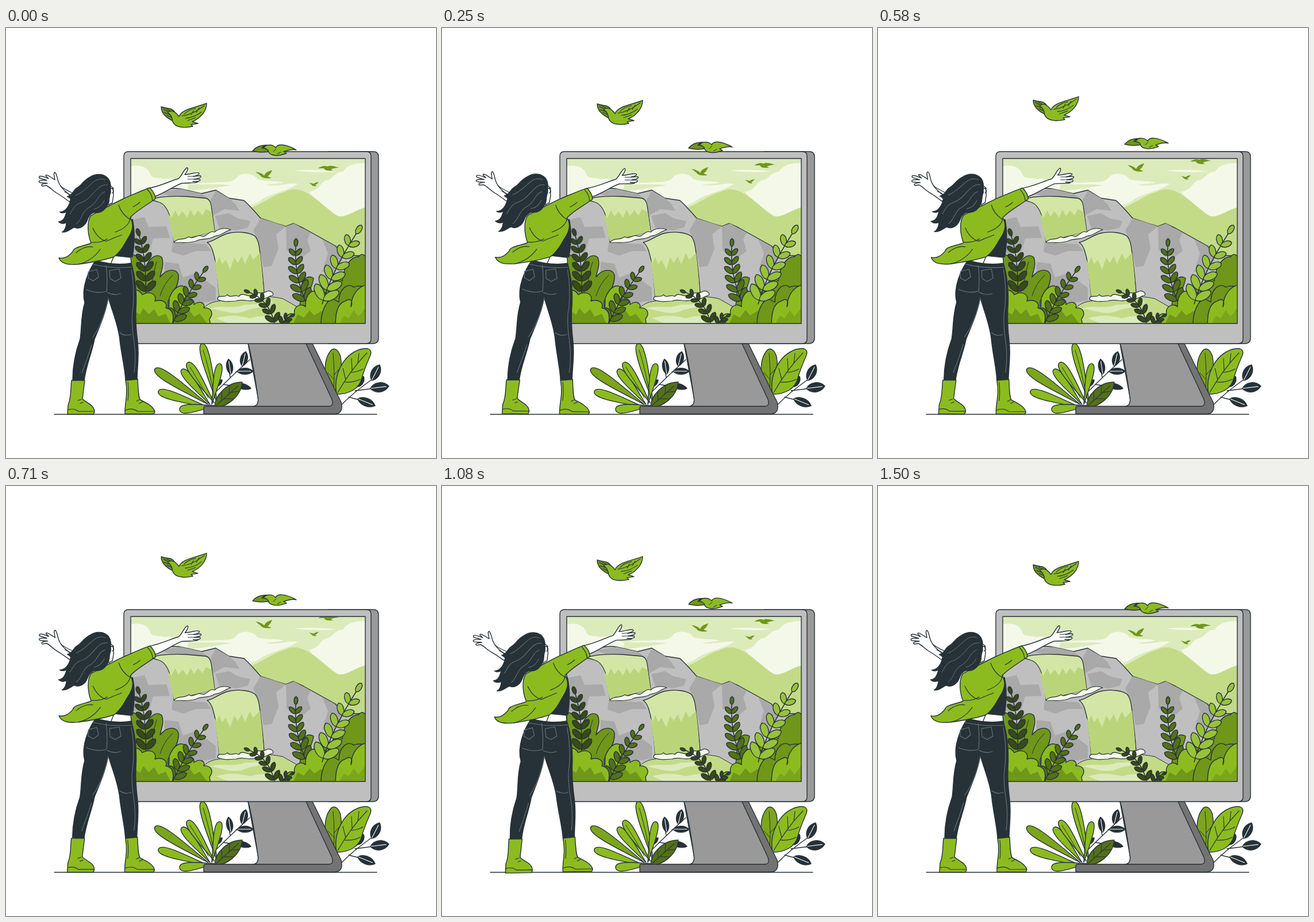
An HTML page with a canvas that plays this animation: 748x748 px, repeating every 1.54 s.

```html
<!DOCTYPE html>
<html lang="en">
<head>
<meta charset="utf-8">
<title>Waterfall view</title>
<style>
html, body { margin: 0; width: 100%; height: 100%; overflow: hidden; background: #fff; }
canvas { display: block; width: 748px; height: 748px; }
</style>
</head>
<body>
<canvas id="stage"></canvas>
<script>
const SIZE = 748, LOOP = 1540, CYCLE = 36, FPS = 24;
const INK = '#263238', GREEN = '#8cbb20', MID = '#70961a', DEEP = '#54701a', DARK = '#38491a';
const SKY = '#dcebbc', CLOUD = '#f4f8e9', HILL = '#c3db87', FALL = '#bad579';
const ROCK = '#bfbfbf', SHADE = '#a9a9a9', SEAM = '#69757a';

const canvas = document.getElementById('stage');
const ctx = canvas.getContext('2d');
const dpr = window.devicePixelRatio || 1;
canvas.width = canvas.height = SIZE * dpr;

// filled and outlined shape, flat shape, open line
function shape(d, fill, stroke = INK, width = 1.4) {
  const path = new Path2D(d);
  if (fill) { ctx.fillStyle = fill; ctx.fill(path); }
  if (stroke) { ctx.strokeStyle = stroke; ctx.lineWidth = width; ctx.stroke(path); }
}
const flat = (d, fill) => shape(d, fill, null);
const line = (d, color = INK, width = 1.4) => shape(d, null, color, width);

// leaf from base b to tip t; profiles place the widest part
const PROFILE = { blade: [.4, 1, .3], point: [.2, .7, .8], oval: [.15, .85, .85] };
function leaf(bx, by, tx, ty, w, fill, profile = 'blade', vein = null) {
  const dx = tx - bx, dy = ty - by, len = Math.hypot(dx, dy);
  const nx = -dy / len * w, ny = dx / len * w;
  const at = (u, s) => `${bx + dx * u + nx * s} ${by + dy * u + ny * s}`;
  const [a, b, k] = PROFILE[profile];
  shape(`M${bx} ${by} C${at(a, k)} ${at(b, 1)} ${tx} ${ty} C${at(b, -1)} ${at(a, -k)} ${bx} ${by}Z`, fill);
  if (vein) line(`M${at(.05, 0)} L${at(.85, 0)}`, vein, 1.1);
}

// curved stem with pairs of leaves that get smaller toward the top
function sprig(x0, y0, cx, cy, x1, y1, pairs, len, w, fill) {
  line(`M${x0} ${y0} Q${cx} ${cy} ${x1} ${y1}`, INK, 1.5);
  for (let i = 0; i <= pairs; i++) {
    const u = .06 + .94 * i / pairs, v = 1 - u;
    const x = v * v * x0 + 2 * u * v * cx + u * u * x1;
    const y = v * v * y0 + 2 * u * v * cy + u * u * y1;
    const a = Math.atan2(v * (cy - y0) + u * (y1 - cy), v * (cx - x0) + u * (x1 - cx));
    const size = len * (1 - .45 * u), wide = w * (1 - .4 * u);
    for (const turn of i === pairs ? [0] : [-.75, .75])
      leaf(x, y, x + size * Math.cos(a + turn), y + size * Math.sin(a + turn), wide, fill, 'oval');
  }
}

function floorPlants() {
  line('M366 632 Q392 606 424 577 M390 607 L386 588 M400 598 L424 597 M378 620 L416 626');
  leaf(411, 588, 417, 563, 9, INK, 'point', '#fff');
  leaf(391, 602, 387, 576, 8, INK, 'point', '#fff');
  leaf(402, 597, 430, 597, 8, INK, 'point', '#fff');
  leaf(398, 620, 426, 627, 7, INK, 'point');
  leaf(364, 624, 376, 612, 5, INK, 'point');
  leaf(352, 655, 259, 593, 15, '#7ca51d');
  leaf(368, 655, 341, 549, 14, GREEN);
  leaf(355, 655, 306, 594, 13, GREEN);
  leaf(362, 652, 316, 582, 14, GREEN);
  leaf(358, 655, 372, 584, 12, GREEN);
  leaf(352, 660, 265, 632, 14, GREEN);
  leaf(364, 657, 302, 664, 14, GREEN);
  line('M362 640 Q354 595 343 560 M352 644 Q338 618 320 590', INK, 1);
  leaf(363, 659, 411, 616, 18, DEEP, 'point', INK);
  line('M376 648 L375 633 M388 637 L389 622 M379 645 L395 645 M391 634 L405 632', INK, 1);

  line('M582 657 Q604 634 640 609 M607 631 L655 625 M596 642 L630 651');
  leaf(636, 613, 650, 586, 11, INK, 'point', '#fff');
  leaf(634, 627, 666, 623, 12, INK, 'point', '#fff');
  leaf(612, 645, 642, 657, 10, INK, 'point', '#fff');
  leaf(612, 624, 622, 606, 7, INK, 'point');
  shape('M571 637 C552 616 550 578 566 560 C572 555 579 561 582 572 C586 596 580 620 571 637Z', '#7ca51d');
  line('M570 632 Q572 598 569 566 M571 612 L560 600 M571 603 L581 592', INK, 1);
  shape('M575 637 C569 606 585 569 616 559 C630 555 637 559 634 569 C628 583 623 594 619 609 C615 627 598 637 575 637Z', GREEN);
  line('M577 634 Q600 594 628 565 M591 612 L586 592 M602 596 L601 575 M612 583 L614 566 M589 616 Q605 617 616 611 M601 599 Q613 598 621 593', INK, 1.1);
}

function monitor() {
  shape('M347 658 H430 Q441 657 438 641 L421 549 H533 L583 651 Q588 671 571 671.5 H344 V661 Q344 658 347 658Z', '#737373');
  shape('M420 545 H520 L567 646 Q571 658 561 658 H430 Q441 657 438 641 C433 608 429 574 420 545Z', '#999');
  shape('M560 215 H639 Q648 215 648 224 V539 Q648 549 638 549 H560Z', '#999');
  shape('M213 215 H627 Q635 215 635 223 V541 Q635 549 627 549 H213 Q205 549 205 541 V223 Q205 215 213 215Z', ROCK);
}

function landscape() {
  flat('M217 227 H625 V514 H217Z', SKY);
  flat('M217 241 C232 236 247 242 251 254 C254 264 266 259 276 263 C290 259 300 268 317 272 C335 268 354 270 371 268 C386 268 397 268 403 258 C413 250 432 253 437 263 C452 268 470 265 482 269 C472 272 462 271 452 273 C470 277 495 268 508 271 C490 284 457 288 440 302 L400 320 H217Z', CLOUD);
  flat('M318 271 C345 274 371 270 392 274 C362 277 340 283 315 283Z', SKY);
  flat('M500 248 Q532 245 574 249 Q540 253 500 248Z', CLOUD);
  flat('M625 235 C607 234 592 239 586 250 C571 250 569 264 557 265 C545 269 548 281 527 285 L570 340 H625Z', CLOUD);
  flat('M418 316 C446 307 462 291 485 285 C495 280 503 279 514 283 C536 290 555 313 577 327 C591 331 608 316 625 312 V410 H420Z', HILL);

  shape('M210 318 C231 306 247 291 266 285 C280 279 293 278 304 280 L340 288 L365 282 L388 296 L414 300 Q426 311 443 331 L470 340 L487 345 L500 340 L517 348 L546 364 L573 379 Q582 391 596 396 L630 396 V520 H210Z', ROCK);
  flat('M266 286 L304 280 L340 288 L353 298 L310 294 L285 292Z', SHADE);
  flat('M365 283 L388 296 L399 306 L406 318 L380 315 L360 326 L356 299Z', SHADE);
  flat('M364 327 L388 322 L403 331 L425 336 L421 347 L402 352 L371 348Z', SHADE);
  flat('M443 331 L487 345 L470 359 L474 384 L462 414 L448 416 L440 376 L430 352Z', SHADE);
  flat('M487 345 L501 340 L530 356 L524 368 L530 388 L514 400 L500 386 L488 388Z', SHADE);
  flat('M550 367 L572 380 L590 395 L571 425 L550 424 L560 392Z', SHADE);
  flat('M218 334 L241 329 L248 346 L279 345 L285 365 L256 366 L249 391 L218 392Z', SHADE);
  flat('M290 373 L348 376 L357 388 L330 388 L308 396 L288 389Z M276 407 L300 410 L308 434 L330 426 L365 452 L365 474 L328 480 L275 440Z', SHADE);

  // upper fall
  shape('M250 299 C266 293 290 292 313 293 L347 296 Q355 297 357 309 L363 353 L292 372 C290 346 286 309 266 303 Q258 300 250 299Z', '#d3e6a6', INK, 1.3);
  flat('M281 322 L288 330 L294 317 L300 328 L307 319 L315 330 L321 316 L327 327 L334 317 L342 326 L348 315 L358 320 L363 354 L292 371Z', FALL);
  // lower fall
  shape('M350 373 C362 371 371 361 387 357 C406 353 425 356 433 362 C440 369 441 384 443 400 C446 425 448 445 449 462 L371 472 C369 440 366 410 361 393 C359 384 356 377 350 373Z', '#d3e6a6', INK, 1.3);
  flat('M362 402 L366 410 L371 398 L376 411 L382 403 L390 420 L397 399 L403 409 L410 397 L416 411 L424 392 L430 403 L442 391 C445 415 447 440 448 462 L371 471 C369 447 366 423 362 402Z', FALL);
  shape('M292 373 C299 364 309 370 318 363 C326 369 332 358 340 362 C350 365 352 351 363 355 C371 347 384 348 391 351 C379 354 377 361 363 362 C352 370 339 365 330 371 C316 375 306 373 292 373Z', CLOUD, INK, 1.1);

  // pool
  shape('M330 515 C334 495 345 478 370 475 C410 469 450 463 482 471 L515 490 V520 H330Z', HILL, INK, 1);
  flat('M354 488 C379 481 393 490 416 481 C432 482 445 478 466 476 C447 488 429 486 414 493 C395 501 372 489 354 488Z M366 505 Q393 496 424 505 Q450 497 477 505 L455 513 H385Z', SKY);
  shape('M368 472 C368 462 380 471 385 464 C392 471 397 462 405 467 C411 458 420 469 429 465 C435 456 444 465 454 458 C460 456 467 461 464 465 C454 467 449 475 434 473 C424 478 412 470 400 475 C389 476 376 477 368 472Z', CLOUD, INK, 1.2);

  // left thicket
  shape('M212 520 V396 C225 389 234 402 240 423 C248 399 262 391 271 399 C276 413 269 424 268 433 C281 417 297 419 300 430 C301 450 289 462 282 475 V520Z', MID);
  line('M262 407 Q254 432 253 456 M290 430 Q274 445 268 466', INK, 1);
  sprig(243, 465, 245, 405, 232, 362, 6, 25, 8, DARK);
  shape('M282 520 L284 470 C292 448 309 442 313 456 C317 463 312 468 309 474 C321 466 328 474 327 481 C338 473 347 479 344 487 C357 486 362 496 354 506 L356 520Z', GREEN);
  flat('M283 486 L294 494 L302 486 L310 497 L319 491 L327 502 L337 497 L350 514 H283Z', MID);
  sprig(290, 514, 310, 470, 343, 425, 6, 24, 8, DEEP);
  shape('M212 520 V462 C226 451 233 457 237 464 C250 456 263 463 259 475 C272 471 282 478 278 487 C290 489 294 500 288 520Z', GREEN);
  flat('M222 514 L225 493 L233 499 L239 487 L248 498 L258 489 L265 502 L278 497 L286 514Z', MID);

  // right thicket
  shape('M558 520 L564 466 C566 434 575 430 585 440 C588 411 602 397 613 398 C622 387 628 400 630 410 V520Z', MID);
  shape('M507 520 L513 465 C511 441 522 428 535 435 C533 451 525 457 529 466 C541 448 557 444 561 458 L565 520Z', MID);
  sprig(523, 480, 501, 430, 504, 380, 6, 25, 8, DEEP);
  shape('M487 520 C482 505 490 494 502 498 C499 484 514 477 521 485 C520 463 534 450 543 463 C552 453 562 462 559 478 L572 520Z', GREEN);
  flat('M500 514 L507 498 L518 504 L528 491 L536 500 L549 492 L566 514Z', MID);
  shape('M548 520 C547 490 559 471 570 472 L579 477 C579 453 595 442 605 451 C613 446 622 452 630 447 V520Z', MID);
  sprig(550, 480, 566, 425, 609, 358, 6, 32, 11, '#98c23a');
  shape('M573 520 C573 500 575 479 590 475 C602 467 603 478 600 485 C601 463 613 449 630 446 V520Z', GREEN);
  flat('M580 514 L588 500 L596 505 L605 491 L613 502 L625 487 V514Z', '#7ca51d');

  sprig(468, 516, 458, 473, 424, 460, 5, 19, 6, DARK);
  sprig(480, 516, 484, 506, 494, 502, 2, 15, 5, DARK);
}

function screenBirds() {
  flat('M434 250 C440 251 446 253 449 257 C452 250 458 249 463 247 C461 253 458 256 455 258 L462 261 C455 262 446 262 443 257Z', MID);
  flat('M543 244 C549 240 555 239 559 241 C565 238 572 241 580 243 C571 243 568 245 565 246 L569 248 C560 249 555 248 553 244Z', MID);
  flat('M527 269 L535 271 Q539 268 544 268 Q541 272 538 273 L540 275 Q534 276 531 272Z', MID);
}

function frontBirds() {
  shape('M270 137 C280 141 289 138 293 146 L301 155 L291 162 C280 157 270 149 270 137Z', MID);
  line('M274 141 L284 147 M275 147 L287 151 M280 152 L289 156 M279 141 L285 144', INK, 1.1);
  shape('M282 146 C288 142 295 146 301 154 C306 141 328 139 349 131 C349 145 338 157 324 163 L334 166 L322 168 L325 171 C311 174 295 174 290 163 C289 156 287 150 282 148Z', GREEN);
  line('M306 153 Q324 151 345 135 M310 150 Q317 142 330 140 M312 157 Q327 156 340 146 M316 161 L330 156 M322 151 L326 144 M331 147 L336 139', INK, 1.1);

  shape('M429 214 C436 205 445 203 457 204 L462 214 C449 217 440 217 429 214Z', MID);
  shape('M445 209 C450 203 463 201 469 208 C472 202 483 200 505 212 C495 210 491 213 483 215 L488 218 L478 221 C468 223 457 221 456 213 C453 209 449 209 445 209Z', GREEN);
  flat('M446 206 L450 204 L452 206 L448 209Z', INK);
  line('M470 210 L465 215 M478 216 L472 219', INK, 1);
}

function woman() {
  // far arm and face
  shape('M110 302 C102 296 95 291 88 287 C81 283 77 277 70 274 L63 275 C60 273 62 271 72 270 L59 269 C55 267 57 264 71 265 L58 261 C56 257 60 256 74 262 L69 257 C69 254 73 256 85 264 C84 258 82 252 85 251 C88 252 89 261 91 267 C95 278 106 289 120 294Z', '#fff');
  shape('M180 273 L186 278 L187 291 L185 304 L179 307 L180 320 H160 V290Z', '#fff');
  line('M179 279 H187 M185 279 Q189 285 185 287', INK, 1.6);

  // top, waist, jeans
  shape('M188 396 L217 399 L218 411 H182Z', '#fff');
  shape('M207 338 L220 333 C224 351 224 374 220 398 L192 396Z', INK);
  shape('M156 404 C177 411 201 412 218 409 C224 430 228 460 226 490 C225 511 227 530 229 546 C232 571 228 591 228 614 L208 613 C207 592 201 570 198 543 C196 519 185 494 178 469 C174 494 164 517 154 541 C150 564 139 587 136 614 L116 612 C116 588 121 563 129 541 C132 521 130 501 137 478 C130 452 144 421 156 404Z', INK);
  line('M151 411 Q184 419 219 416 M143 424 L158 420 L161 433 L152 440 L143 435Z M180 422 L197 419 L200 435 L190 441 L181 436Z M174 413 Q177 434 175 458 Q158 463 140 455 M176 460 Q188 466 199 462 M218 420 Q224 452 221 486 Q217 506 222 540 Q227 570 223 599 M178 470 Q170 511 151 538 M198 530 Q207 537 218 533 M149 551 Q141 577 132 600', SEAM, 1.1);

  // boots
  shape('M114 613 H137 L133 645 C140 653 154 655 154 668 L152 672 H107 L108 656 C114 642 112 629 114 613Z', GREEN);
  shape('M208 613 L229 611 C230 627 230 644 234 647 C244 652 257 658 259 668 L257 671.5 H207 C206 652 213 639 208 613Z', GREEN);
  line('M108 664 Q119 661 126 667 H153 M131 646 L125 648 M134 651 L129 653 M207 665 Q220 660 229 667 H258 M233 646 L227 649 M238 650 L232 653 M212 616 Q214 635 212 648', INK, 1.1);

  // near arm
  shape('M247 279 C270 275 288 265 300 262 C307 256 309 246 315 243 C318 244 315 250 311 255 C320 255 328 251 335 252 C338 254 334 256 326 258 L338 257 C341 259 338 261 327 263 L337 263 C340 266 334 268 325 267 L333 268 C332 270 314 269 306 270 C292 275 278 286 257 294Z', '#fff');
  line('M316 258 L327 258 M316 263 L328 263', INK, 1);

  // jacket
  shape('M148 326 C165 317 185 306 204 297 C221 290 235 283 250 278 C254 281 260 290 260 297 C244 309 226 318 216 330 C224 343 219 356 212 366 C205 378 199 390 188 398 C167 405 140 409 125 411 C111 412 97 412 92 400 C103 402 110 396 116 389 C118 380 138 379 148 374 C142 359 140 337 148 326Z', GREEN);
  line('M196 308 Q201 324 216 333 M246 281 Q254 289 255 300 M151 348 Q159 366 174 371 Q188 365 201 360 M149 373 Q165 374 176 367 M216 332 Q213 347 190 355 M122 391 Q137 378 151 381 M126 411 Q150 405 164 385 M221 311 Q228 308 233 303', INK, 1.2);

  // hair
  shape('M182 272 C180 254 160 250 146 259 C134 265 131 274 123 278 C116 282 117 290 106 293 C110 296 114 296 111 303 C108 312 102 320 93 320 C97 323 101 322 105 320 C102 331 99 336 91 337 C95 341 100 341 105 339 C104 348 101 353 97 355 C106 357 113 349 119 347 C126 351 137 346 141 336 C144 328 147 323 154 321 C163 323 171 318 175 311 C182 304 178 295 182 287Z', INK, INK, 1);
  line('M173 264 C152 256 145 282 121 291 M176 273 C158 270 151 297 130 304 C119 307 115 318 111 324 M172 285 C159 289 160 305 143 313 C132 320 132 334 122 341 M171 300 Q165 313 153 315', SEAM, 1);
  line('M118 288 Q100 280 95 275 M114 296 Q110 288 102 285', INK, 1.1);
}

// sway: 0 to 1 at a quarter, -1 at three quarters, back to 0
const sway = u => u < .25 ? 4 * u : u < .75 ? 2 - 4 * u : 4 * u - 4;
const lift = u => -15 * (1 - Math.abs(1 - 2 * u));

function moved(dy, draw) {
  ctx.save();
  ctx.translate(0, dy);
  draw();
  ctx.restore();
}

function render(u) {
  ctx.setTransform(dpr, 0, 0, dpr, 0, 0);
  ctx.lineJoin = ctx.lineCap = 'round';
  flat(`M0 0 H${SIZE} V${SIZE} H0Z`, '#fff');
  line('M84 672 H645');
  floorPlants();
  monitor();

  ctx.save();
  ctx.beginPath();
  ctx.rect(217, 227, 408, 287);
  ctx.clip();
  landscape();
  moved(lift(u), screenBirds);
  ctx.restore();
  line('M217 227 H625 V514 H217Z');

  moved(lift(u), frontBirds);

  ctx.save();
  ctx.translate(197, 458);
  ctx.rotate(sway(u) * Math.PI / 180);
  ctx.translate(-197, -458);
  woman();
  ctx.restore();
}

const start = performance.now();
let shown = -1;
function tick() {
  const t = (performance.now() - start) % LOOP;
  const step = Math.min(CYCLE, Math.floor((t + 4) * FPS / 1000));
  if (step !== shown) render((shown = step) / CYCLE);
  requestAnimationFrame(tick);
}
tick();
</script>
</body>
</html>
```
